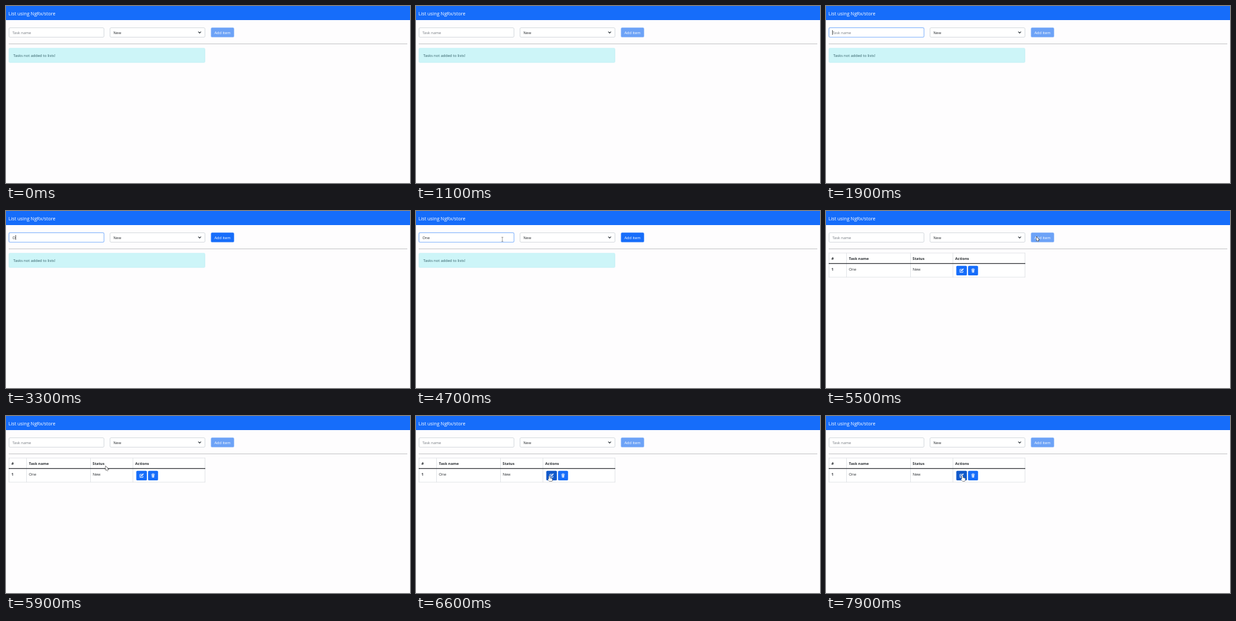
An HTML page with a canvas that plays this animation: 600x264 px, repeating every 8000 ms.

```html
<!DOCTYPE html>
<html lang="en">
<head>
<meta charset="utf-8">
<title>Task list</title>
<style>
  html, body { margin: 0; width: 100%; height: 100%; overflow: hidden; background: #fefdfe; }
  canvas { display: block; width: 600px; height: 264px; }
</style>
</head>
<body>
<canvas id="stage" width="600" height="264"></canvas>
<script>
const ctx = document.getElementById('stage').getContext('2d');
const LOOP = 8000, STEP = 100;
const BLUE = '#166dfa', HOVER = '#1059cb', DISABLED = '#6ca2f7';
const INK = '#2b2f33', GREY = '#757b82', BORDER = '#d0d5da';

const times = { focus: 1700, submit: 5500, blur: 5300 };
const keys = [[3300, 'O'], [3700, 'On'], [4200, 'One']];
// time, x, y of the pointer's hot spot
const route = [
  [4500, 66, 40], [4800, 150, 43], [5200, 312.5, 38.5], [5500, 312.5, 38.5],
  [5900, 148, 75], [6200, 187, 87], [6500, 198, 89.5], [7400, 198, 89.5], [7800, 202.5, 89]
];

const clamp = v => Math.max(0, Math.min(1, v));

function text(str, x, y, color = INK, size = 5.6, weight = 400) {
  ctx.font = `${weight} ${size}px "Open Sans", "Noto Sans", sans-serif`;
  ctx.fillStyle = color;
  ctx.fillText(str, x, y);
}

function box(x, y, w, h, r, fill, stroke, line = 0.8) {
  ctx.beginPath();
  ctx.roundRect(x, y, w, h, r);
  if (fill) { ctx.fillStyle = fill; ctx.fill(); }
  if (stroke) { ctx.strokeStyle = stroke; ctx.lineWidth = line; ctx.stroke(); }
}

function rect(x, y, w, h, color) {
  ctx.fillStyle = color;
  ctx.fillRect(x, y, w, h);
}

function shape(path, x, y, fill, stroke, width = 0.8) {
  ctx.save();
  ctx.translate(x, y);
  const p = new Path2D(path);
  ctx.lineJoin = ctx.lineCap = 'round';
  if (stroke) { ctx.strokeStyle = stroke; ctx.lineWidth = width; ctx.stroke(p); }
  if (fill) { ctx.fillStyle = fill; ctx.fill(p); }
  ctx.restore();
}

function pointerAt(t) {
  if (t < route[0][0]) return null;
  for (let i = 1; i < route.length; i++) {
    const [t0, x0, y0] = route[i - 1], [t1, x1, y1] = route[i];
    if (t > t1) continue;
    const u = clamp((t - t0) / (t1 - t0)), k = u * u * (3 - 2 * u);
    return { x: x0 + (x1 - x0) * k, y: y0 + (y1 - y0) * k };
  }
  const [, x, y] = route[route.length - 1];
  return { x, y };
}

const inside = (p, x, y, w, h) => !!p && p.x >= x && p.x <= x + w && p.y >= y && p.y <= y + h;

function drawInput(t) {
  const value = t < times.submit ? keys.reduce((v, [at, s]) => t >= at ? s : v, '') : '';
  const focus = clamp((t - times.focus + 100) / 200) * (1 - clamp((t - times.blur) / 200));
  if (focus > 0) box(3.7, 31.8, 142.4, 15.2, 2.2, `rgba(13,110,253,${0.3 * focus})`);
  box(4.5, 32.5, 141, 14, 1.6, '#fff', focus > 0 ? '#82b3fb' : BORDER);
  text(value || 'Task name', 9.4, 41.7, value ? INK : GREY);

  if (t < times.focus || t >= times.blur) return;
  const start = keys.reduce((s, [at]) => t >= at ? at : s, 1900);
  if (t >= start && Math.floor((t - start) / 500) % 2) return;
  const x = 9.4 + (value ? ctx.measureText(value).width + 0.2 : 0);
  rect(x, 36, 0.7, 7, '#222');
}

function drawForm(t, pointer) {
  drawInput(t);
  box(154.5, 32.5, 141, 14, 1.6, '#fff', BORDER);
  text('New', 159.4, 41.7);
  shape('M-1.7 -.8L0 .9L1.7 -.8', 287.6, 39.4, null, '#343a40', 1.1);

  const enabled = t >= keys[0][0] && t < times.submit;
  const over = inside(pointer, 304, 32, 35, 15);
  box(304.4, 32.3, 34.3, 14.3, 1.6, !enabled ? DISABLED : over ? HOVER : BLUE);
  text('Add item', 309.4, 41.7, '#fff', 5.75);
  rect(4, 56, 592, 1, '#c9c9cb');
}

function drawAlert() {
  box(4.4, 63, 291, 21.2, 1.4, '#cdf5f8', '#bdeef4', 0.7);
  text('Tasks not added to lists!', 10.8, 75.7, '#315e66', 5.63);
}

function drawTable(pointer) {
  rect(4, 62, 292, 37, '#fff');
  for (const x of [4, 30, 125, 188, 295]) rect(x, 62.5, 0.8, 36.5, '#dfe2e5');
  for (const y of [62.4, 98.4]) rect(4, y, 292, 0.8, '#dfe2e5');
  rect(4, 77.8, 292, 1.1, '#292c30');

  [['#', 8], ['Task name', 34], ['Status', 128.6], ['Actions', 191.7]]
    .forEach(([label, x]) => text(label, x, 73.1, INK, 5.55, 700));
  text('1', 8, 88.6, INK, 5.6, 700);
  text('One', 34, 88.6);
  text('New', 128.8, 88.6);

  const over = inside(pointer, 193.5, 81.7, 15.8, 14.4);
  box(193.5, 81.7, 15.8, 14.4, 1.6, over ? HOVER : BLUE);
  box(211, 81.7, 14.8, 14.4, 1.6, BLUE);
  shape('M.8 -2H-2.3V2.5H2.1V.6', 201.2, 89, null, '#fff', 0.8);
  shape('M-.7 .7L2.6 -2.5', 201.2, 89, null, '#fff', 1.2);
  shape('M-2.3 -1.9H2.3M-.8 -2.8H.8', 218.4, 89, null, '#fff', 0.8);
  shape('M-1.9 -1.2H1.9L1.6 2.8H-1.6Z', 218.4, 89, '#fff');
  shape('M-.6 -.3V1.9M.6 -.3V1.9', 218.4, 89, null, BLUE, 0.4);
}

function drawPointer(p, hasTable) {
  if (!p) return;
  const onButton = inside(p, 304, 32, 35, 15) && !hasTable
    || hasTable && inside(p, 193.5, 81.7, 15.8, 14.4);
  if (onButton) {
    shape('M-.7 .3Q0 -.6 .7 .3V3L3.8 3.7Q4.7 4 4.5 5L3.8 8H.2L-2.2 5.2Q-2 4.1 -.7 5Z',
      p.x, p.y, '#fff', '#20242a', 0.9);
  } else if (inside(p, 4, 32, 142, 15)) {
    shape('M-1 -3H1M0 -3V3M-1 3H1', p.x, p.y, null, '#555', 0.5);
  } else {
    shape('M0 0V6L1.4 4.8L2.3 6.9L3.2 6.5L2.3 4.5H4.2Z', p.x, p.y, '#fff', '#222', 0.9);
  }
}

function draw(t) {
  const pointer = pointerAt(t), hasTable = t >= times.submit;
  rect(0, 0, 600, 264, '#fefdfe');
  rect(0, 0, 600, 21, BLUE);
  text('List using NgRx/store', 3.8, 13.6, '#fff', 7.1);
  drawForm(t, pointer);
  if (hasTable) drawTable(pointer);
  else drawAlert();
  drawPointer(pointer, hasTable);
}

const began = performance.now();
function tick() {
  const t = (performance.now() - began) % LOOP;
  draw(Math.floor(t / STEP) * STEP);
  requestAnimationFrame(tick);
}
tick();
</script>
</body>
</html>
```
